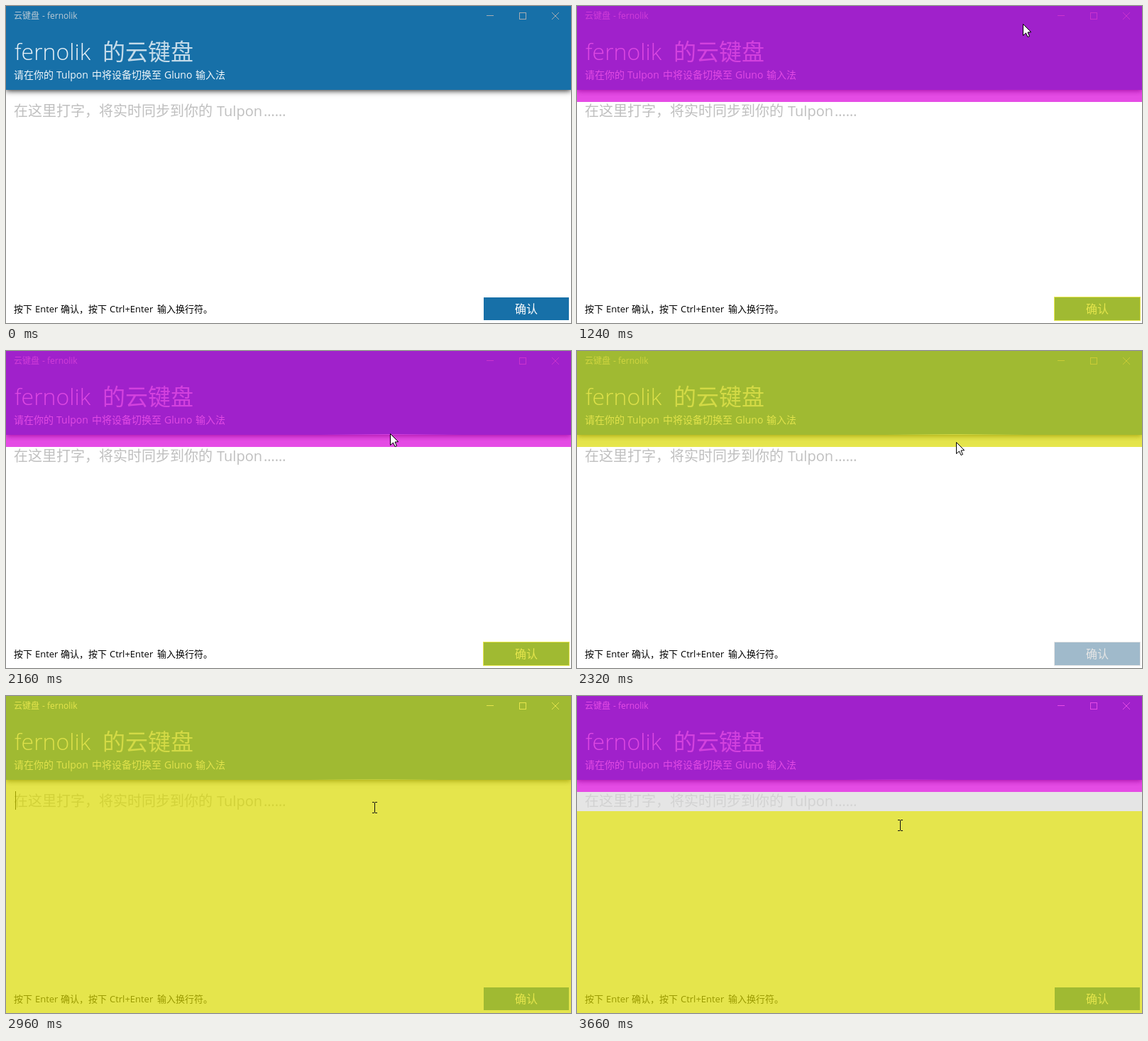
An HTML page with a canvas that plays this animation: 796 px wide and 446 px high, repeating every 4.66 s.

```html
<!DOCTYPE html>
<html lang="zh-CN">
<head>
<meta charset="utf-8">
<title>云键盘</title>
<style>
html, body { margin: 0; width: 100%; height: 100%; overflow: hidden; background: #fff; }
canvas { display: block; }
</style>
</head>
<body>
<canvas id="stage" width="796" height="446"></canvas>
<script>
const ctx = document.getElementById('stage').getContext('2d');
const W = 796, H = 446, LOOP = 4660;
const BLUE = '#1770a8';
const FONT = '"Open Sans", "Noto Sans CJK SC", "Noto Sans CJK", sans-serif';
const USER = 'fernolik', DEVICE = 'Tulpon';

const MAGENTA = 0, GREY = 1, YELLOW = 2;
const TINTS = ['218,0,218', '218,218,218', '218,218,0'].map(c => `rgba(${c},.7)`);

// Evenly spaced repaints; the tint moves on by one at each
function burst(start, end, count, firstTint) {
  return Array.from({ length: count }, (_, i) => ({
    time: Math.floor((start + (end - start) * i / Math.max(1, count - 1)) / 10) * 10,
    tint: (firstTint + i) % TINTS.length
  }));
}
const REPAINTS = [
  ...burst(1000, 1620, 9, MAGENTA),
  ...burst(1770, 2790, 14, GREY),
  ...burst(2960, 2960, 1, YELLOW),
  ...burst(3250, 3660, 6, GREY)
];
const ENTER_TEXT = 2400, ACTIVATE = 2960, RESUME = 3250, CARET_OFF = 3410;

const POINTER_PATH = [
  { time: 1000, x: 662, y: 7 },
  { time: 1540, x: 583, y: 50 },
  { time: 2160, x: 541, y: 116 },
  { time: 2640, x: 520, y: 155 },
  { time: 3250, x: 518, y: 159 },
  { time: 3660, x: 455, y: 182 }
];

const HEADER = [0, 0, W, 135];
const BUTTON = [672, 409, 122, 34];

function rect(color, x, y, w, h) {
  ctx.fillStyle = color;
  ctx.fillRect(x, y, w, h);
}

// Draws [text, x] runs on one baseline
function runs(size, weight, color, y, ...parts) {
  ctx.font = `${weight} ${size}px ${FONT}`;
  ctx.fillStyle = color;
  for (const [text, x] of parts) ctx.fillText(text, x, y);
}

function line(...points) {
  ctx.beginPath();
  for (const [x, y] of points) ctx.lineTo(x, y);
}

function pointerAt(time) {
  const i = Math.max(1, POINTER_PATH.findIndex(p => p.time >= time));
  const a = POINTER_PATH[i - 1], b = POINTER_PATH[i];
  const k = (time - a.time) / (b.time - a.time);
  return { x: Math.round(a.x + (b.x - a.x) * k), y: Math.round(a.y + (b.y - a.y) * k) };
}

function drawHeader(pointer) {
  ctx.save();
  ctx.shadowColor = 'rgba(0,0,0,.9)';
  ctx.shadowBlur = 8;
  ctx.shadowOffsetY = 1;
  rect(BLUE, 0, 0, W, 118);
  ctx.restore();
  if (!pointer) return;

  const glow = ctx.createRadialGradient(pointer.x, pointer.y, 0, pointer.x, pointer.y, 100);
  glow.addColorStop(0, 'rgba(255,255,255,.8)');
  glow.addColorStop(1, 'rgba(255,255,255,0)');
  rect(glow, 0, 117, W, 1);
}

function drawCaption(active, hover) {
  if (hover) rect('rgba(255,255,255,.12)', 660, 0, 45, 29);
  runs(12, 400, active ? '#fff' : '#bccbd5', 18, ['云键盘', 11], ['- ' + USER, 51]);
  ctx.strokeStyle = active ? '#fff' : '#a6adb2';
  ctx.lineWidth = 1;
  ctx.strokeRect(723.5, 9.5, 9, 9);
  line([677, 13.5], [687, 13.5]);
  ctx.stroke();
  line([769, 9], [779, 19]);
  ctx.stroke();
  line([779, 9], [769, 19]);
  ctx.stroke();
}

function drawWindow(time, pointer) {
  rect('#fff', 0, 0, W, H);
  drawHeader(pointer);
  drawCaption(time >= ACTIVATE, time === REPAINTS[0].time);
  runs(32, 300, 'rgba(255,255,255,.9)', 76, [USER, 12]);
  runs(32, 300, 'rgba(255,255,255,.75)', 76, ['的云键盘', 136]);
  runs(14, 400, '#f3f8fb', 102,
    ['请在你的', 11], [DEVICE, 71], ['中将设备切换至', 121], ['Gluno', 223], ['输入法', 267]);
  runs(20, 400, '#bfbfbf', 155,
    ['在这里打字，将实时同步到你的', 11], [DEVICE, 297], ['……', 363]);
  runs(13, 400, '#000', 431,
    ['按下', 11], ['Enter', 41], ['确认，按下', 77], ['Ctrl+Enter', 146], ['输入换行符。', 213]);
  rect(BLUE, 673, 410, 120, 32);
  runs(16, 400, '#fff', 432, ['确认', 717]);
  if (time >= ACTIVATE && time < CARET_OFF) rect('#000', 13, 134, 1, 26);
}

// Tints an area, leaving the confirm button out
function tintAround(tint, x, y, w, h) {
  ctx.beginPath();
  ctx.rect(x, y, w, h);
  ctx.rect(...BUTTON);
  ctx.fillStyle = TINTS[tint];
  ctx.fill('evenodd');
}

function drawTints({ time, tint }) {
  rect(TINTS[tint], ...HEADER);
  rect(TINTS[(tint + 2) % TINTS.length], ...BUTTON);

  if (time >= RESUME) {
    const top = time >= CARET_OFF ? 162 : 135;
    rect(TINTS[GREY], 0, 135, W, top - 135);
    tintAround(YELLOW, 0, top, W, H - top);
  } else if (time >= ENTER_TEXT) {
    tintAround(GREY, 0, 135, W, 308);
  }
}

function drawTextPointer(x, y) {
  rect('#111', x, y - 7, 1, 14);
  for (const edge of [y - 8, y + 7]) {
    rect('#111', x - 3, edge, 3, 1);
    rect('#111', x + 1, edge, 3, 1);
  }
}

function drawArrow(x, y) {
  ctx.save();
  ctx.translate(x + .5, y + .5);
  line([0, 0], [0, 16], [4, 12.5], [6.5, 18], [9, 17], [6.5, 11.5], [11.2, 11.2]);
  ctx.closePath();
  ctx.fillStyle = '#fff';
  ctx.fill();
  ctx.strokeStyle = '#000';
  ctx.lineWidth = 1;
  ctx.stroke();
  ctx.restore();
}

function render(now) {
  const repaint = REPAINTS.filter(r => r.time <= now).pop();
  if (!repaint) return drawWindow(0, null);

  const pointer = pointerAt(repaint.time);
  drawWindow(repaint.time, pointer);
  if (repaint.time === ACTIVATE) rect(TINTS[YELLOW], 0, 0, W, H);
  else drawTints(repaint);
  (pointer.y >= 135 ? drawTextPointer : drawArrow)(pointer.x, pointer.y);
}

const start = performance.now();
function tick() {
  render((performance.now() - start) % LOOP);
  requestAnimationFrame(tick);
}
tick();
</script>
</body>
</html>
```
